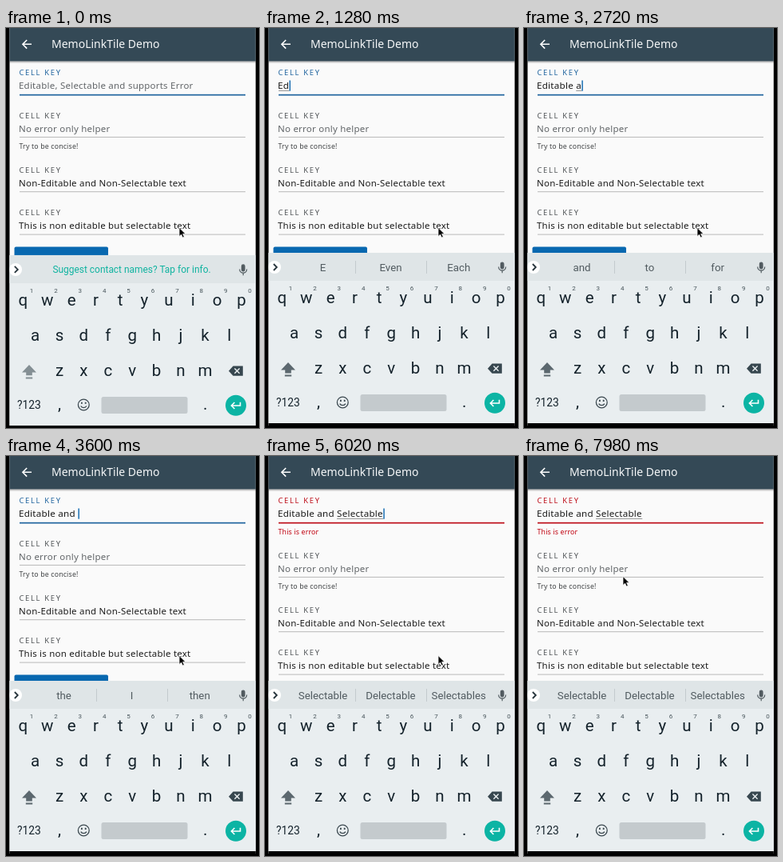
An HTML page that plays this animation: 317 by 500 pixels, repeating every 8000 ms.

```html
<!DOCTYPE html>
<html lang="en">
<head>
<meta charset="utf-8">
<title>Form cell demo</title>
<style>
html, body { margin: 0; width: 100%; height: 100%; overflow: hidden; background: #000; }
svg { display: block; width: 100%; height: 100%; }
text { white-space: pre; font-family: "Noto Sans", "Open Sans", sans-serif; }
.title { font-size: 14px; font-weight: 500; fill: #f5f7f8; }
.label { font-size: 9.4px; letter-spacing: 1.7px; fill: #505457; }
.value { font-size: 11.5px; letter-spacing: 0.23px; fill: #1c1c1c; }
.hint { fill: #626669; }
.helper { font-size: 8.8px; letter-spacing: 0.15px; fill: #404345; }
#input { font-size: 11.65px; }
#keyboard text { font-family: Roboto, "Noto Sans", sans-serif; text-anchor: middle; }
.key { font-size: 20.5px; fill: #14222b; }
.digit { font-size: 8px; fill: #47545a; }
.sug { font-size: 13.3px; fill: #515b60; }
.tip { font-size: 11.95px; fill: #0fb3a0; }
</style>
</head>
<body>
<svg viewBox="0 0 317 500" preserveAspectRatio="none">
  <clipPath id="screen"><rect x="4.5" width="308.3" height="497"/></clipPath>
  <linearGradient id="shade" x2="0" y2="1">
    <stop stop-color="#000" stop-opacity="0.3"/>
    <stop offset="1" stop-color="#000" stop-opacity="0"/>
  </linearGradient>
  <rect width="317" height="500" fill="#000"/>
  <g clip-path="url(#screen)">
    <rect x="4" width="309" height="497" fill="#fafafa"/>
    <rect x="4" width="309" height="41.5" fill="#344956"/>
    <rect x="4" y="41.5" width="309" height="3" fill="url(#shade)"/>
    <path d="M32 20.3H21.2M26.2 15l-5.3 5.3 5.3 5.3" fill="none" stroke="#fff" stroke-width="1.6"/>
    <text class="title" x="57" y="25">MemoLinkTile Demo</text>

    <text class="label" id="label" x="16.4" y="59.4">CELL KEY</text>
    <text class="value hint" id="hint" x="16" y="76.4">Editable, Selectable and supports Error</text>
    <text class="value" id="input" x="16" y="76.4"></text>
    <rect id="composing" y="77.9" height="0.7" fill="#666"/>
    <rect id="caret" y="65.5" width="1.5" height="13.2" fill="#1a6fb3"/>
    <rect id="underline" x="17" y="82.8" width="283" height="1.7"/>
    <text class="helper" id="error" x="16.5" style="fill:#c0000f">This is error</text>

    <g id="below"></g>

    <g id="keyboard">
      <rect x="4" y="281" width="309" height="213" fill="#e9eef0"/>
      <rect x="4" y="494" width="309" height="6" fill="#000"/>
      <rect x="4" y="281" width="309" height="35" fill="#dfe5e7"/>
      <circle cx="12" cy="299" r="8" fill="#fff"/>
      <path d="M10.8 295l4 4-4 4" fill="none" stroke="#26343b" stroke-width="1.8"/>
      <g fill="none" stroke="#515b60" stroke-width="1.2">
        <rect x="295.4" y="293" width="3.6" height="8" rx="1.8" fill="#515b60"/>
        <path d="M292.7 298.5a4.5 4.7 0 0 0 9 0M297.2 303.3v2.9"/>
      </g>
      <text class="tip" id="tip" x="157.5" y="303">Suggest contact names? Tap for info.</text>
      <g id="strip">
        <path d="M113.5 291v16M202.5 291v16" stroke="#c3cacd"/>
        <text class="sug" x="72.5" y="303.6"></text>
        <text class="sug" x="157.5" y="303.6"></text>
        <text class="sug" x="242.7" y="303.6"></text>
      </g>
      <g id="keys"></g>
      <path id="shift" d="M29 418l9 9.6h-5.2v3.8h-7.6v-3.8H20zM24.8 433.6h8.4v2h-8.4z"/>
      <path d="M284.6 419.6h12.2v12.2h-12.2l-5.6-6.1z" fill="#37474f"/>
      <path d="M286.4 422.6l6.2 6.2m0-6.2l-6.2 6.2" stroke="#e9eef0" stroke-width="1.4"/>
      <text class="key" x="29" y="473" style="font-size:13.8px">?123</text>
      <text class="key" x="67" y="474">,</text>
      <g fill="none" stroke="#3c4950" stroke-width="1.3">
        <circle cx="97.3" cy="468" r="6.9"/>
        <path d="M93.7 469.6a3.9 3.2 0 0 0 7.2 0"/>
        <path d="M94.9 464.8v2.1M99.7 464.8v2.1" stroke-width="1.8"/>
      </g>
      <rect x="119.5" y="458" width="108" height="21" rx="2.5" fill="#c4cacd"/>
      <text class="key" x="249.7" y="474">.</text>
      <circle cx="288" cy="468.8" r="13" fill="#0cb4a4"/>
      <path d="M293.5 464.7v4.3H282.6M286.4 465l-4 4 4 4" fill="none" stroke="#fff" stroke-width="1.6"/>
    </g>

    <path id="pointer" d="M0 0V11L2.6 8.7 4.4 12.6 6.4 11.7 4.6 7.9H8z" fill="#000" stroke="#fff" stroke-width="0.8"/>
  </g>
</svg>
<script>
const LOOP = 8000;
const $ = id => document.getElementById(id);
const clamp = v => Math.min(1, Math.max(0, v));

// [time, text, start of the word being composed]
const typed = [
  [0, '', 0], [1120, 'E', 0], [1260, 'Ed', 0], [1440, 'Edi', 0], [1540, 'Edit', 0],
  [1740, 'Edita', 0], [1960, 'Editab', 0], [2040, 'Editabl', 0], [2120, 'Editable', 0],
  [2340, 'Editable ', 9], [2720, 'Editable a', 9], [2800, 'Editable an', 9],
  [2880, 'Editable and', 9], [3160, 'Editable and ', 13], [3960, 'Editable and S', 13],
  [4240, 'Editable and Se', 13], [4440, 'Editable and Sel', 13], [4680, 'Editable and Sele', 13],
  [5080, 'Editable and Selec', 13], [5440, 'Editable and Select', 13],
  [5620, 'Editable and Selecta', 13], [5800, 'Editable and Selectab', 13],
  [5940, 'Editable and Selectabl', 13], [6000, 'Editable and Selectable', 13]
];

// [time, left, middle, right, middle is bold]
const offers = [
  [0], [1160, 'E', 'Even', 'Each'], [1300, 'Ed', 'End', 'Edge', 1], [1480, 'Edi', 'Edit', 'Edits', 1],
  [1580, 'Edit', 'Edits', 'Edited'], [1800, 'Edita', 'Edits', 'Editable', 1],
  [2000, 'Editab', 'Editable', 'Edits', 1], [2140, 'Editable', 'Edit able', 'Editableness'],
  [2420, 'and', 'to', 'for'], [2760, 'a', 'and', 'at'], [2840, 'an', 'and', 'any'],
  [2920, 'and', 'ands', 'any'], [3160, 'the', 'I', 'then'], [3960, 'S', 'So', 'She'],
  [4280, 'Se', 'See', 'Set'], [4480, 'Sel', 'Sell', 'Self'], [4760, 'Sele', 'Select', 'Selected', 1],
  [5120, 'Selec', 'Select', 'Selected', 1], [5480, 'Select', 'Selected', 'Selection'],
  [5620, 'Selecta', 'Select', 'Selectable', 1], [5800, 'Selectab', 'Selectable', 'Delectable', 1],
  [6020, 'Selectable', 'Delectable', 'Selectables']
];

const caretOff = [[0, 120], [660, 1120], [3660, 3960], [6600, 7200], [7700, LOOP]];
const ERROR_AT = 4280;

const label = y => `<text class="label" x="16.4" y="${y}">CELL KEY</text>`;
const cell = (y, text, cls = '') => label(y) +
  `<text class="value ${cls}" x="16" y="${y + 17.2}">${text}</text>` +
  `<rect x="17" y="${y + 23.4}" width="283" height="1" fill="#b9b9b9"/>`;
$('below').innerHTML =
  cell(112.5, 'No error only helper', 'hint') +
  '<text class="helper" x="16.5" y="150.8">Try to be concise!</text>' +
  cell(180.8, 'Non-Editable and Non-Selectable text') +
  cell(234.2, 'This is non editable but selectable text') +
  '<rect x="10.5" y="273.6" width="117.5" height="30" rx="2" fill="#0868b0"/>';

const STEP = 30.4;
const row = (letters, x, y, cls = 'key') => [...letters].map((c, i) =>
  `<text class="${cls}" x="${x + i * STEP}" y="${y}">${c}</text>`).join('');
$('keys').innerHTML = row('qwertyuiop', 21.4, 344) + row('1234567890', 32, 328, 'digit') +
  row('asdfghjkl', 36.6, 388) + row('zxcvbnm', 67, 432);

const at = (list, t) => list.filter(e => e[0] <= t).pop();
const show = (el, on) => el.setAttribute('visibility', on ? 'visible' : 'hidden');
const bezier = (a, b, c, d, u) => {
  const v = 1 - u;
  return a * v * v * v + 3 * b * v * v * u + 3 * c * v * u * u + d * u * u * u;
};

const input = $('input');
const sugs = document.querySelectorAll('.sug');

function drawInput(t) {
  const [, text, start] = at(typed, t);
  input.textContent = text;
  const width = n => n ? input.getSubStringLength(0, n) : 0;
  const end = 16.4 + width(text.length);
  const from = Math.max(17, 16 + width(Math.min(start, text.length)));
  show($('hint'), !text);
  show($('composing'), start < text.length);
  $('composing').setAttribute('x', from);
  $('composing').setAttribute('width', Math.max(0, end - from));
  $('caret').setAttribute('x', end);
  show($('caret'), !caretOff.some(([a, b]) => t >= a && t < b));
}

function drawError(t) {
  const failed = t >= ERROR_AT;
  const k = clamp((t - ERROR_AT) / 217);
  const ease = 1 - (1 - k) ** 2;
  const color = failed ? '#bd0f1a' : '#21659f';
  $('label').style.fill = color;
  $('underline').setAttribute('fill', color);
  $('error').setAttribute('y', 92.6 + 5 * ease);
  $('error').setAttribute('opacity', failed ? k : 0);
  $('below').setAttribute('transform', `translate(0 ${failed ? 15 : 0})`);
}

function drawKeyboard(t) {
  const k = clamp(t / 200);
  $('keyboard').setAttribute('transform', `translate(0 ${3 * (1 - k) ** 2})`);
  const mix = (a, b) => Math.round(a + (b - a) * k);
  $('shift').setAttribute('fill', `rgb(${mix(132, 92)},${mix(143, 104)},${mix(148, 111)})`);
  const [, left, mid, right, bold] = at(offers, t);
  show($('tip'), !left);
  show($('strip'), left);
  [left, mid, right].forEach((s, i) => { sugs[i].textContent = s || ''; });
  sugs[1].style.fontWeight = bold ? 700 : 400;
}

function drawPointer(t) {
  const u = clamp((t - 7600) / 380);
  const x = bezier(217, 285, 270, 124, u);
  const y = bezier(249.5, 235, 120, 150.5, u);
  $('pointer').setAttribute('transform', `translate(${x} ${y})`);
}

function frame() {
  const t = performance.now() % LOOP;
  drawInput(t);
  drawError(t);
  drawKeyboard(t);
  drawPointer(t);
  requestAnimationFrame(frame);
}
frame();
</script>
</body>
</html>
```
